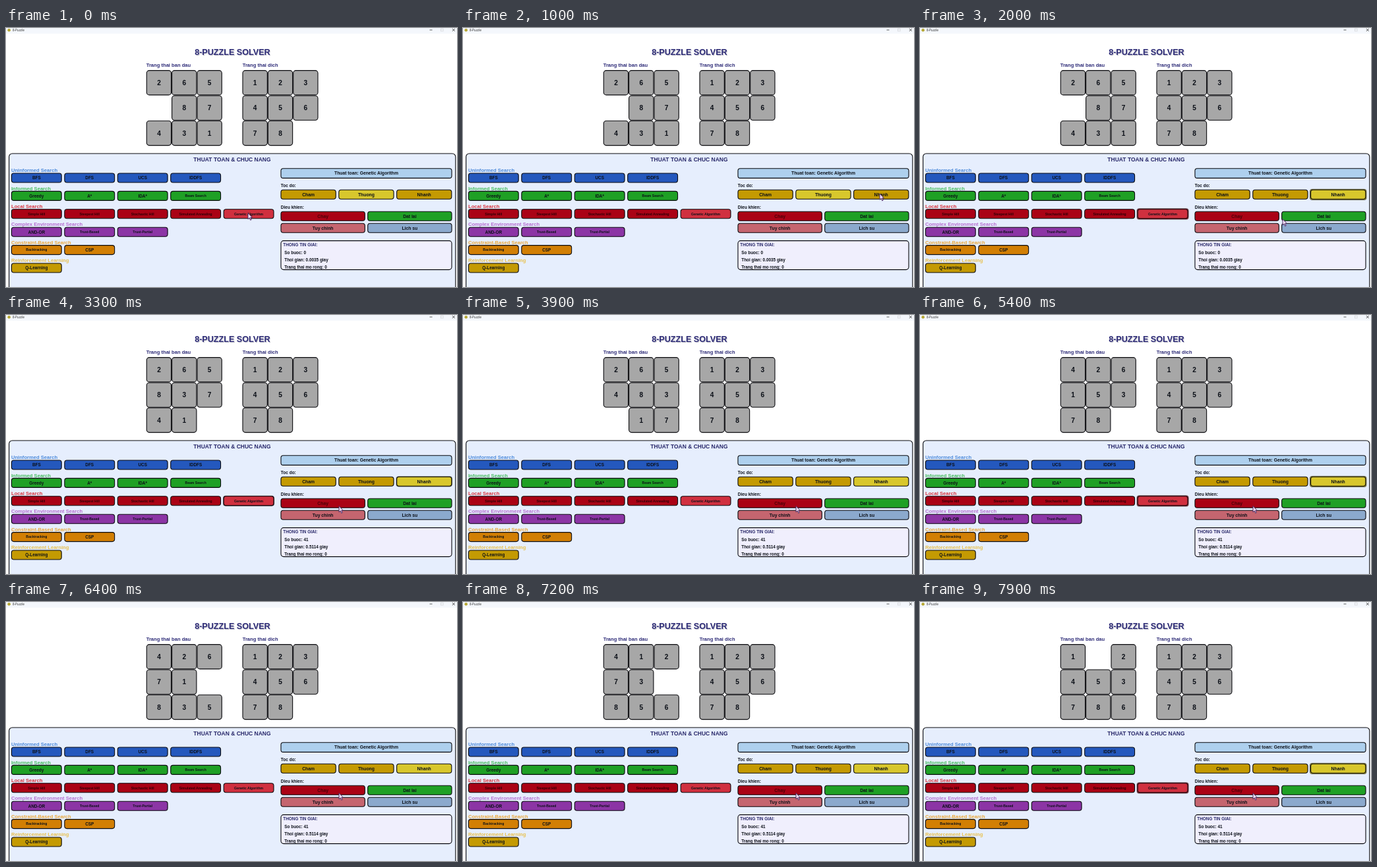
An HTML page that plays this animation: 684x394 px, repeating every 8000 ms.

```html
<!DOCTYPE html>
<html lang="vi">
<head>
<meta charset="utf-8">
<title>8-Puzzle</title>
<style>
  html, body { margin: 0; width: 100%; height: 100%; overflow: hidden; background: #fff; }
  svg { display: block; width: 684px; height: 394px; }
  text { font-family: "Liberation Sans", Arial, sans-serif; font-weight: bold; }
</style>
</head>
<body>
<svg id="stage" viewBox="0 0 684 394"></svg>
<script>
const LOOP = 8000;
const SOLVE_START = 2900, STEP_MS = 131, RESULT_AT = 2800, FAST_AT = 1100;
const NAVY = '#2e2c78', INK = '#0c1018', GOLD = '#c49a02', YELLOW = '#d8c72c';
const stage = document.getElementById('stage');

function add(tag, attrs, content = '') {
  const node = document.createElementNS('http://www.w3.org/2000/svg', tag);
  for (const key in attrs) node.setAttribute(key, attrs[key]);
  node.textContent = content;
  return stage.appendChild(node);
}

// y is the middle of the capital letters
const label = (content, x, y, size, fill = INK, anchor = 'start') =>
  add('text', { x, y: y + size * 0.36, 'font-size': size, fill, 'text-anchor': anchor }, content);

const box = (x, y, width, height, fill, rx = 3.5) =>
  add('rect', { x, y, width, height, rx, fill, stroke: '#08080c', 'stroke-width': 1.1 });

function button(content, x, y, width, fill, size = 6.6, ink = INK) {
  const rect = box(x, y, width, 14, fill);
  label(content, x + width / 2, y + 7, size, ink, 'middle');
  return rect;
}

// A button with a halo behind it that can swell
function glowButton(content, x, y, width, fill, size) {
  const halo = box(x, y, width, 14, fill);
  halo.setAttribute('stroke-opacity', 0.55);
  const rect = button(content, x, y, width, fill, size);
  return (pad, colour) => {
    const shape = { x: x - pad, y: y - pad, width: width + 2 * pad, height: 14 + 2 * pad, fill: colour };
    for (const key in shape) halo.setAttribute(key, shape[key]);
    halo.setAttribute('visibility', pad ? 'visible' : 'hidden');
    rect.setAttribute('fill', colour);
  };
}

// Window bar and headings
add('rect', { width: 684, height: 8.5, fill: '#f4f7fc' });
add('circle', { cx: 4.6, cy: 3.2, r: 2.3, fill: '#b5a632' });
add('text', { x: 10, y: 5, 'font-size': 4.6, fill: '#222', style: 'font-family:"Open Sans",sans-serif;font-weight:400' }, '8-Puzzle');
add('path', { d: 'M642.5 3h4M676.8 1l4 4m0-4l-4 4', stroke: '#333', 'stroke-width': 0.8 });
add('rect', { x: 659.5, y: 1.2, width: 3.6, height: 3.6, fill: 'none', stroke: '#d2d4d8', 'stroke-width': 0.7 });
label('8-PUZZLE SOLVER', 344.4, 37.2, 12.6, '#c3c3cb', 'middle');
label('8-PUZZLE SOLVER', 343.4, 36.2, 12.6, NAVY, 'middle');
label('Trang thai ban dau', 212.7, 56.3, 7.6, NAVY);
label('Trang thai dich', 358.7, 56.3, 7.6, NAVY);

// Boards
const makeBoard = left => Array.from({ length: 9 }, (_, i) => {
  const x = left + i % 3 * 38.35, y = 64.6 + Math.floor(i / 3) * 38.35;
  return [box(x, y, 37.3, 37.3, '#a7a7a7', 4), label('', x + 18.7, y + 18.6, 10.2, INK, 'middle')];
});
const showBoard = (board, state) => board.forEach(([rect, digit], i) => {
  rect.setAttribute('visibility', state[i] === '0' ? 'hidden' : 'visible');
  digit.textContent = state[i] === '0' ? '' : state[i];
});
const board = makeBoard(213.3);
showBoard(makeBoard(359), '123456780');

// Every state along the solution; letters give the direction of the blank
const MOVES = 'RDRULLDRRUULLDDRURDULLDRRUULDDRULDLUURRDD';
const SHIFT = { L: -1, R: 1, U: -3, D: 3 };
const states = ['265087431'];
for (const move of MOVES) {
  const cells = [...states.at(-1)];
  const from = cells.indexOf('0'), to = from + SHIFT[move];
  [cells[from], cells[to]] = [cells[to], cells[from]];
  states.push(cells.join(''));
}

// Algorithm panel
box(4.6, 191, 677.2, 220, '#e6eefd', 5);
label('THUAT TOAN & CHUC NANG', 343, 199.8, 8.5, '#29296a', 'middle');
const GROUPS = [
  ['Uninformed Search', '#4f8cdb', '#2458bd', 'BFS,DFS,UCS,IDDFS'],
  ['Informed Search', '#48bd60', '#1fa025', 'Greedy,A*,IDA*,Beam Search'],
  ['Local Search', '#d8343c', '#aa0215', 'Simple Hill,Steepest Hill,Stochastic Hill,Simulated Annealing'],
  ['Complex Environment Search', '#b66fd0', '#8c35a5', 'AND-OR,Trust-Based,Trust-Partial'],
  ['Constraint-Based Search', '#e9a83c', '#d27f04', 'Backtracking,CSP'],
  ['Reinforcement Learning', '#e8c04c', GOLD, 'Q-Learning'],
];
GROUPS.forEach(([title, tint, fill, names], row) => {
  const y = 221 + row * 27.4;
  label(title, 8, y - 4.6, 7.6, tint);
  names.split(',').forEach((name, col) =>
    button(name, 8.4 + col * 80.45, y, 75.8, fill, name.length > 10 ? 5.1 : 6.4, row === 2 ? '#300006' : INK));
});
const setGenetic = glowButton('Genetic Algorithm', 330.2, 275.8, 75.8, '#d0303f', 5.1);

// Controls
box(417, 213.8, 259, 14.6, '#aed0ee');
label('Thuat toan: Genetic Algorithm', 546.5, 221, 6.75, INK, 'middle');
label('Toc do:', 416.8, 239.2, 6.5);
button('Cham', 417, 246.3, 83.2, GOLD, 6.8);
const setNormal = glowButton('Thuong', 504.8, 246.3, 83.2, GOLD, 6.8);
const setFast = glowButton('Nhanh', 592.6, 246.3, 83.2, GOLD, 6.8);
label('Dieu khien:', 416.8, 272.4, 6.5);
button('Chay', 417, 279.3, 127.3, '#aa0215', 6.8, '#4c0008');
button('Dat lai', 548.7, 279.3, 127.3, '#1fa025', 6.8);
button('Tuy chinh', 417, 297.3, 127.3, '#c5656f', 6.8);
button('Lich su', 548.7, 297.3, 127.3, '#8ba9cd', 6.8);

// Result box
box(417, 323.6, 259, 44, '#f0effd', 4);
label('THONG TIN GIAI:', 420.3, 329.8, 6.4, '#29296a');
const stepCount = label('', 422.3, 341.4, 6.4);
const solveTime = label('', 422.3, 352.6, 6.4);
label('Trang thai mo rong: 0', 422.3, 364.2, 6.3);

const cursor = add('path', {
  d: 'M0 0V9.2L2.2 7.3L3.7 10.8L5.2 10.1L3.7 6.8H6.4Z',
  fill: '#f3dff3', stroke: '#44205c', 'stroke-width': 0.9,
});

// time, x, y
const PATH = [[0, 367, 281.5], [900, 632, 252], [1250, 632, 252], [2000, 550, 290.6], [2450, 505, 290.6], [LOOP, 505, 290.6]];
function cursorAt(t) {
  const i = PATH.findIndex(p => p[0] > t);
  const [t0, x0, y0] = PATH[i - 1], [t1, x1, y1] = PATH[i];
  const u = (t - t0) / (t1 - t0), ease = u * u * (3 - 2 * u);
  return [x0 + (x1 - x0) * ease, y0 + (y1 - y0) * ease];
}

function draw(t) {
  const step = Math.floor((t - SOLVE_START) / STEP_MS);
  showBoard(board, states[Math.min(Math.max(step, 0), MOVES.length)]);

  const solved = t >= RESULT_AT;
  stepCount.textContent = 'So buoc: ' + (solved ? MOVES.length : 0);
  solveTime.textContent = `Thoi gian: ${solved ? '0.5114' : '0.0035'} giay`;

  // The chosen buttons swell in whole pixels of the unscaled window
  const pulse = Math.cos(t * 0.005 - 2.75);
  const pad = Math.max(0, Math.round(pulse * 3.2)) * 0.55;
  const isFast = t >= FAST_AT;
  setGenetic(pad, '#d0303f');
  setNormal(isFast ? 0 : pad, isFast ? GOLD : YELLOW);
  setFast(isFast ? pad : 0, isFast ? YELLOW : GOLD);

  cursor.setAttribute('transform', `translate(${cursorAt(t)})`);
}

const start = performance.now();
function tick() {
  draw((performance.now() - start) % LOOP);
  requestAnimationFrame(tick);
}
tick();
</script>
</body>
</html>
```
